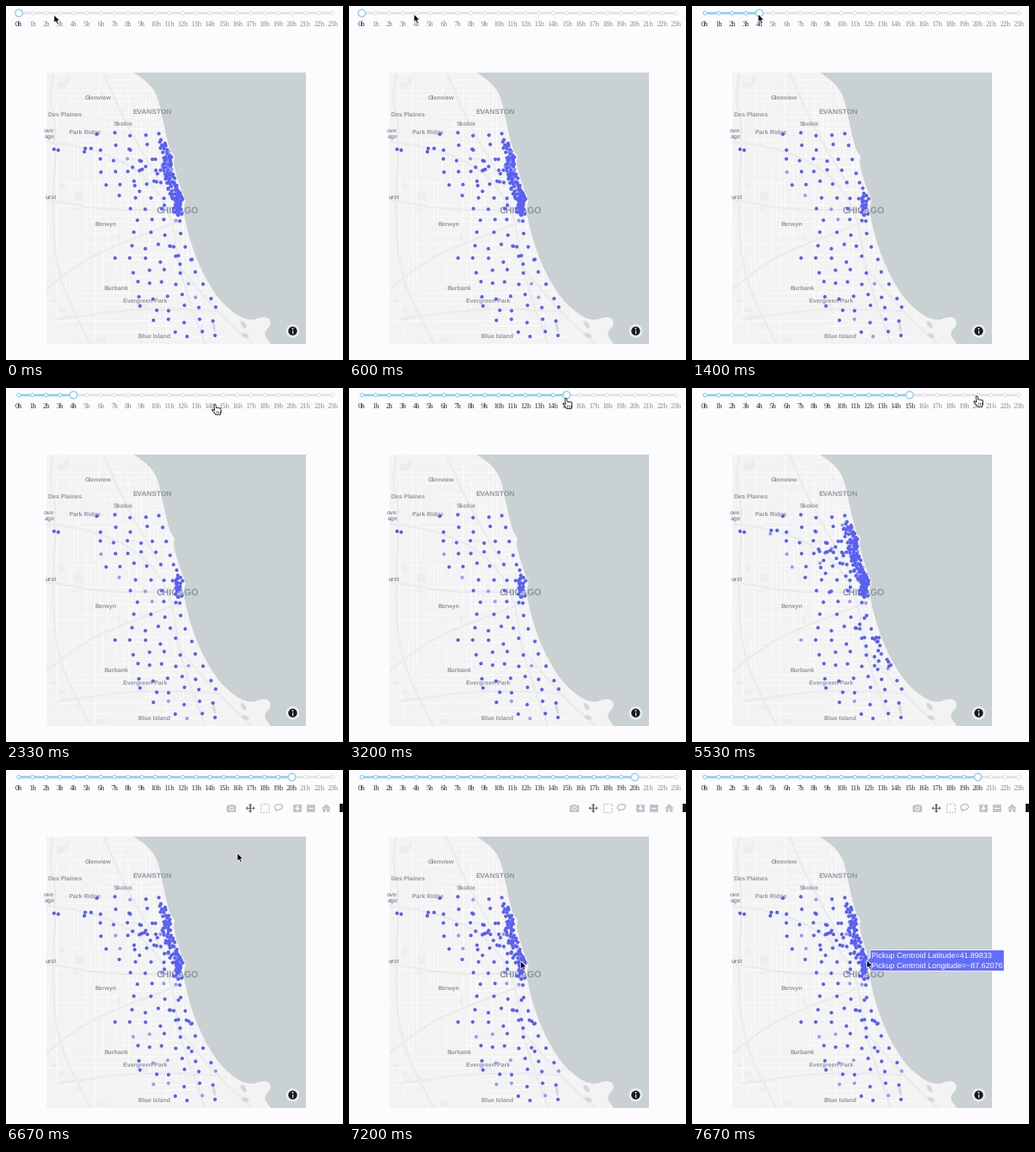
Write a matplotlib script that moves like this. It is 400 by 420 pixels and loops after 8000 ms.

```python
import numpy as np
import matplotlib.pyplot as plt
from matplotlib.animation import FuncAnimation
from matplotlib.collections import LineCollection
from matplotlib.patches import Circle, Ellipse, Polygon, Rectangle

plt.rcParams["text.hinting"] = "none"

W, H, DPI = 400, 420, 100
LOOP, STEP = 8000, 40
PX = 72 / DPI

PAGE, LAND, WATER = "#fcfbfe", "#f3f3f3", "#cad1d3"
DOT, TRACK, RAIL, LABEL = "#636efa", "#8fd0f3", "#e4e2e7", "#8c95a3"

fig = plt.figure(figsize=(W / DPI, H / DPI), dpi=DPI, facecolor=PAGE)
ax = fig.add_axes([0, 0, 1, 1])
ax.set_xlim(0, W)
ax.set_ylim(H, 0)
ax.axis("off")
frame = ax.add_patch(Rectangle((48, 79), 308, 322, fc=LAND, ec="none", zorder=0))


def add(patch, z, clip=False):
    ax.add_patch(patch)
    patch.set_zorder(z)
    if clip:
        patch.set_clip_path(frame)
    return patch


def text(x, y, s, px, color, z, font="Liberation Sans", ha="center", **kw):
    return ax.text(x, y, s, fontsize=px * PX, color=color, family=font,
                   ha=ha, va="center_baseline", zorder=z, **kw)


def smooth(pts, rounds=2):
    """Round off a polyline by corner cutting."""
    p = np.array(pts, float)
    for _ in range(rounds):
        a, b = p[:-1], p[1:]
        mid = np.stack([0.75 * a + 0.25 * b, 0.25 * a + 0.75 * b], 1).reshape(-1, 2)
        p = np.vstack([p[:1], mid, p[-1:]])
    return p


COAST = smooth([
    (152, 79), (170, 92), (180, 107), (185, 130), (194, 171), (201, 178),
    (198, 186), (208, 219), (214, 231), (210, 240), (215, 265), (223, 292),
    (236, 322), (256, 353), (286, 375), (309, 367), (316, 377), (305, 388),
    (314, 401)])
SHORE = COAST[COAST[:, 0] < 280]


def shore_x(y):
    return np.interp(y, SHORE[:, 1], SHORE[:, 0])


# ---------- base map ----------
def draw_map():
    rng = np.random.default_rng(11)
    for _ in range(30):
        corner, size = rng.uniform((48, 79), (280, 400)), rng.uniform(3, 11, 2)
        add(Rectangle(corner, *size, fc="#ecedec", ec="none"), 1, True)

    streets = []
    for k in range(50):
        a, b = sorted(rng.uniform(40, 300, 2))
        streets.append([(a, 80 + 6.5 * k), (b, 80 + 6.5 * k)])
        a, b = sorted(rng.uniform(70, 405, 2))
        streets.append([(50 + 5 * k, a), (50 + 5 * k, b)])
    highways = [smooth(r) for r in (
        [(56, 79), (52, 110), (60, 150), (55, 240), (60, 320), (100, 401)],
        [(48, 161), (100, 168), (160, 194), (197, 245), (204, 310), (236, 401)],
        [(116, 79), (142, 140), (186, 214)],
        [(48, 230), (125, 243), (208, 241)],
        [(48, 336), (85, 307), (120, 288), (204, 256)],
        [(206, 310), (252, 364), (292, 401)],
        [(60, 372), (160, 358), (250, 362)])]
    for lines, color, lw, z in ((streets, "#ffffff", 0.6, 2),
                                (highways, "#dadddf", 1.8, 3),
                                (highways, "#f8f9f9", 0.8, 4)):
        lc = LineCollection(lines, colors=color, linewidths=lw * PX, zorder=z)
        ax.add_collection(lc).set_clip_path(frame)

    add(Polygon(np.vstack([COAST, [(356, 401), (356, 79)]]), fc=WATER, ec="none"), 5, True)
    for x, y, w, h, a in ((282, 378, 5, 10, -35), (247, 381, 3, 12, -10), (284, 391, 9, 5, 20)):
        add(Ellipse((x, y), w, h, angle=a, fc="#d3d9da", ec="none"), 5, True)

    towns = [
        (109, 108.5, "Glenview"), (70.5, 128, "Des Plaines"), (139.5, 139, "Skokie"),
        (94, 149, "Park Ridge"), (51, 147, "ove"), (52, 154.5, "age"),
        (53, 226, "urst"), (118, 259.5, "Berwyn"), (130.5, 334, "Burbank"),
        (165, 348.5, "Evergreen Park"), (176, 391.5, "Blue Island"),
        (173.5, 125, "EVANSTON"), (204, 242, "CHICAGO")]
    for x, y, s in towns:
        px = {"EVANSTON": 8.5, "CHICAGO": 10.6}.get(s, 7.1)
        text(x, y, s, px, LABEL, 6, weight="bold").set_clip_path(frame)

    add(Circle((340.3, 385.6), 8, fc="white", ec="none", alpha=0.6), 7)
    add(Circle((340.3, 385.6), 5.2, fc="#1b1c1e", ec="none"), 8)
    add(Circle((340.3, 382.9), 0.9, fc="white", ec="none"), 9)
    add(Rectangle((339.5, 384.6), 1.7, 3.9, fc="white", ec="none"), 9)


# ---------- pickup points ----------
# west border of the city as (y, x)
WEST = np.array([(150, 135), (165, 111), (205, 115), (230, 138), (255, 156),
                 (285, 150), (300, 130), (314, 152), (365, 160), (390, 205)])
# hour: how many lakefront, inland and southern spots join the base set
BUSY = {4: (0, 0, 0), 0: (84, 16, 5), 15: (92, 28, 20), 20: (62, 20, 9)}


def base_points(rng):
    """One spot per district: rows of even steps from border to shore."""
    pts = [(57, 170), (62, 171), (108, 152)]
    for y in np.arange(153, 392, 14.7):
        x0 = np.interp(y, *WEST.T)
        x1 = min(shore_x(y) - 8, 247)
        xs = np.linspace(x0, x1, round((x1 - x0) / 17) + 1)
        pts += [(x + rng.normal(0, 1.2), y + rng.normal(0, 2)) for x in xs]
    return pts + list(rng.normal((204, 233), (2.6, 8), (22, 2)))


def scatter_pool(n, y_range, near, far, rng):
    """Random spots at some distance from the shore, kept apart."""
    pts = []
    while len(pts) < n:
        y = rng.triangular(*y_range)
        p = np.array([shore_x(y) - near - (far - near) * rng.beta(1, 1.4), y])
        if all(np.hypot(*(p - q)) > 2.4 for q in pts):
            pts.append(p)
    return pts


def make_dots():
    rng = np.random.default_rng(5)
    base = base_points(rng)
    pools = [scatter_pool(92, (156, 205, 248), 3, 15, rng),
             scatter_pool(28, (155, 190, 245), 14, 55, rng),
             scatter_pool(20, (262, 300, 340), 3, 45, rng)]
    far_west = [(93, 173), (94, 169), (101, 169)]
    scatters = {}
    for hour, counts in BUSY.items():
        extra = [p for pool, n in zip(pools, counts) for p in pool[:n]]
        pts = np.array(base + (far_west + extra if hour != 4 else []))
        alpha = np.where(rng.random(len(pts)) < 0.08, 0.6, 1)
        scatters[hour] = ax.scatter(*pts.T, s=(4.2 * PX) ** 2, c="#5860f5",
                                    alpha=alpha, linewidths=0, zorder=10)
    return scatters


# ---------- slider ----------
SY = 8.4


def tick_x(h):
    return 15.3 + 16.2 * h


def make_slider():
    ax.plot([tick_x(0), tick_x(23)], [SY, SY], color=RAIL, lw=2.6 * PX, zorder=20)
    track, = ax.plot([], [], color=TRACK, lw=2.6 * PX, zorder=21)
    rings = [add(Circle((tick_x(h), SY), 2.1, fc="white", lw=1.1 * PX), 22)
             for h in range(24)]
    marks = [text(tick_x(h), 21, f"{h}h", 8.7, "black", 22, "Liberation Serif")
             for h in range(24)]
    handle = add(Circle((0, SY), 4.3, fc="white", ec=TRACK, lw=1.4 * PX), 23)
    return track, rings, marks, handle


def set_slider(hour):
    track.set_data([tick_x(0), tick_x(hour)], [SY, SY])
    handle.set_center((tick_x(hour), SY))
    for h, (ring, mark) in enumerate(zip(rings, marks)):
        ring.set_edgecolor(TRACK if h <= hour else RAIL)
        mark.set_color("#2f2f33" if h <= hour else "#8b8a8f")


# ---------- mode bar ----------
def make_modebar():
    g, dark, y = "#c4c3c8", "#77767c", 45.3
    parts = []

    def put(patch, z=30):
        parts.append(add(patch, z))

    def box(cx, cy, w, h, c, z=30):
        put(Rectangle((cx - w / 2, cy - h / 2), w, h, fc=c, ec="none"), z)

    # camera
    box(267.7, 45.8, 11.5, 7.6, g)
    box(267.7, 41.6, 5, 2, g)
    put(Circle((267.7, 45.8), 2.7, fc=PAGE, ec="none"), 31)
    put(Circle((267.7, 45.8), 1.7, fc=g, ec="none"), 32)

    # pan
    box(290, y, 9, 1.4, dark)
    box(290, y, 1.4, 9, dark)
    for a in np.arange(4) * np.pi / 2:
        turn = np.array([[np.cos(a), np.sin(a)], [-np.sin(a), np.cos(a)]])
        tip = np.array([(5.7, 0), (3.1, -2.3), (3.1, 2.3)]) @ turn
        put(Polygon(tip + (290, y), fc=dark, ec="none"))

    # box select and lasso
    put(Rectangle((302, y - 5), 10, 10, fc="none", ec=g, lw=1.3 * PX, ls=(0, (1.6, 1.2))))
    put(Ellipse((323.5, 44), 9.5, 6.6, angle=-12, fc="none", ec=g, lw=1.5 * PX))
    put(Polygon([(319.5, 46), (322, 47), (320.5, 50.5)], fc=g, ec="none"))

    # zoom in and out
    for x in (346, 362):
        box(x, y, 9.6, 9.6, g)
        box(x, y, 6, 1.6, PAGE, 31)
    box(346, y, 1.6, 6, PAGE, 31)

    # home
    put(Polygon([(374.3, 45.6), (380, 40.2), (385.7, 45.6)], fc=g, ec="none"))
    box(380, 47.8, 8.4, 4.4, g)
    box(380, 48.4, 2.4, 3.4, PAGE, 31)

    box(401, 45, 10, 10, "#16151c")
    return parts


# ---------- tooltip and pointers ----------
def make_tooltip():
    shape = [(207.5, 226), (211.5, 222.5), (211.5, 213.5), (370.5, 213.5),
             (370.5, 238.5), (211.5, 238.5), (211.5, 229.5)]
    parts = [add(Polygon(shape, fc=DOT, ec="white", lw=0.8 * PX), 40)]
    for y, s in ((220.3, "Latitude=41.89833"), (232.2, "Longitude=\u221287.62076")):
        parts.append(text(213.2, y, "Pickup Centroid " + s, 9.1, "white", 41, ha="left"))
    return parts


ARROW = np.array([(0, 0), (0, 9.6), (2.2, 7.6), (3.7, 11), (5.4, 10.3),
                  (3.9, 7), (6.9, 6.8)])
HAND = np.array([(-1.1, 0.5), (0, 0), (1, 0.6), (1.6, 4.2), (7, 4.9), (7.4, 9.2),
                 (6.4, 12.6), (1.2, 12.6), (-3.4, 7), (-2.9, 5.8), (-0.3, 7.4)])

# pointer way points: time, x, y
PATH = np.array([
    (70, 57, 10.5), (670, 78.5, 9.5), (1430, 78.5, 9.5), (1800, 241, 20),
    (1930, 247.5, 19.5), (2330, 247.5, 19.5), (2800, 257.5, 12), (3530, 257.5, 12),
    (4130, 322, 20.5), (4330, 336, 12), (5000, 338, 9.5), (6270, 338, 9.5),
    (6670, 274.5, 98.5), (7070, 212, 200), (7340, 198, 245), (7600, 207.5, 225.5)])

SLIDER_AT = [(0, 0), (1030, 4), (3030, 15), (5630, 20)]
DOTS_AT = [(0, 0), (1200, 4), (4230, 15), (6320, 20)]


def value_at(t, steps):
    return [v for start, v in steps if t >= start][-1]


draw_map()
dots = make_dots()
track, rings, marks, handle = make_slider()
modebar = make_modebar()
tooltip = make_tooltip()
arrow = add(Polygon(ARROW, fc="black", ec="white", lw=0.7 * PX), 50)
hand = add(Polygon(HAND, fc="white", ec="#1c1c1c", lw=0.9 * PX, joinstyle="round"), 50)
creases = ax.add_collection(LineCollection([], colors="#1c1c1c", linewidths=0.7 * PX, zorder=51))


def update(i):
    t = i * STEP + 30
    set_slider(value_at(t, SLIDER_AT))
    for hour, sc in dots.items():
        sc.set_visible(hour == value_at(t, DOTS_AT))

    for p in modebar:
        p.set_alpha(np.clip((t - 6350) / 250, 0, 1))
    for p in tooltip:
        p.set_visible(t >= 7500)

    x, y = (np.interp(t, PATH[:, 0], PATH[:, k]) for k in (1, 2))
    pointing = 1500 <= t < 6400
    arrow.set_visible(not pointing)
    hand.set_visible(pointing)
    creases.set_visible(pointing)
    arrow.set_xy(ARROW + (x, y))
    hand.set_xy(HAND + (x, y))
    creases.set_segments([[(x + d, y + 7.8), (x + d, y + 10.8)] for d in (1.6, 3.6, 5.6)])
    return []


anim = FuncAnimation(fig, update, frames=LOOP // STEP, interval=STEP,
                     init_func=lambda: update(0), repeat=True, repeat_delay=0)
plt.show()
```
